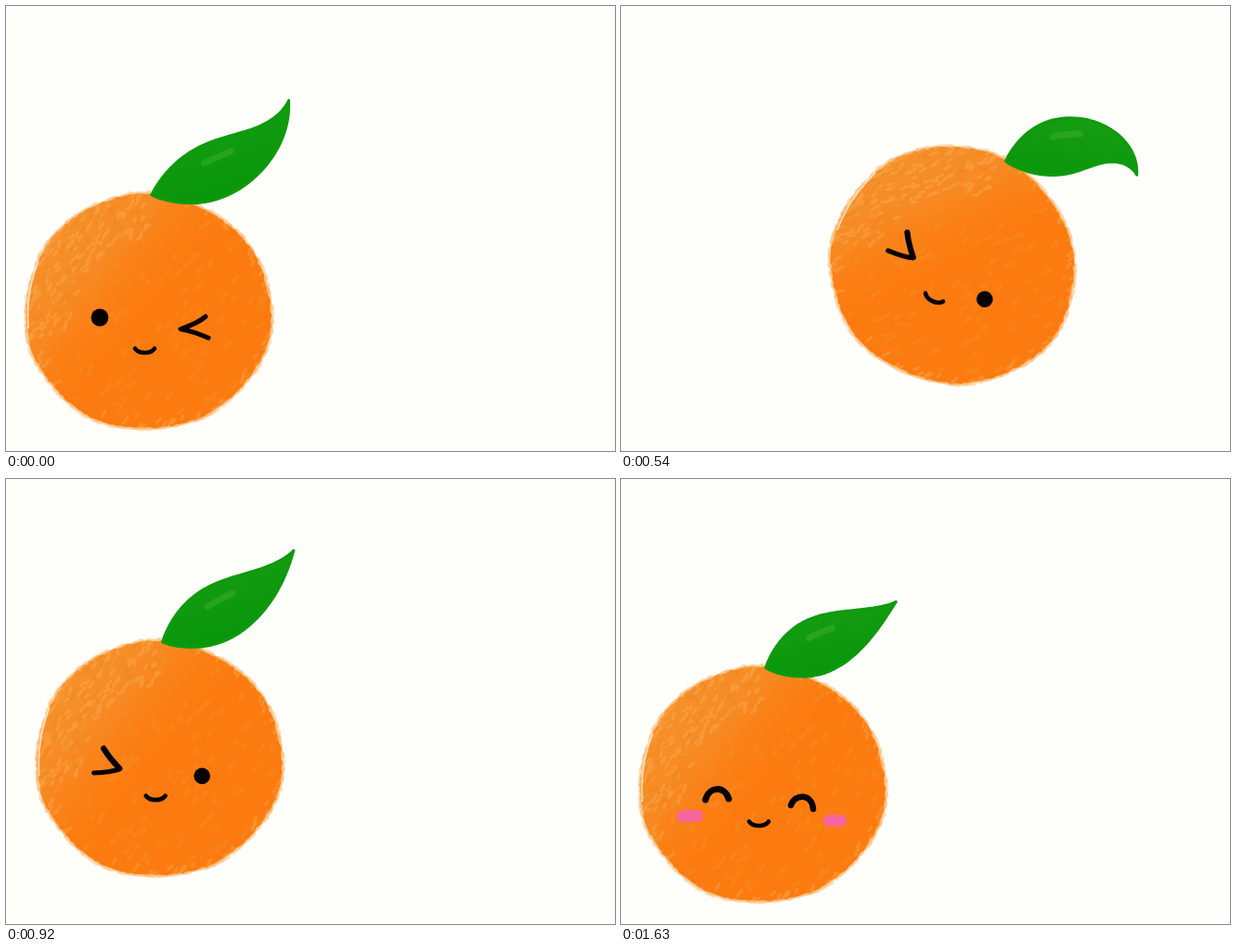
An HTML page that plays this animation: 656 by 480 pixels, repeating every 1680 ms.

```html
<!DOCTYPE html>
<html lang="en">
<head>
<meta charset="utf-8">
<title>Hopping orange</title>
<style>
html, body { margin: 0; width: 100%; height: 100%; overflow: hidden; background: #fefefb; }
svg { display: block; width: 656px; height: 480px; }
.ink { fill: none; stroke: #050200; stroke-width: 5; stroke-linecap: round; stroke-linejoin: round; }
.dot { fill: #050200; }
</style>
</head>
<body>
<svg viewBox="0 0 656 480">
  <defs>
    <linearGradient id="shade" x1="0" y1="0.12" x2="0.6" y2="0.6">
      <stop offset="0" stop-color="#f4962f"/>
      <stop offset="0.45" stop-color="#f68f2a" stop-opacity="0.7"/>
      <stop offset="0.8" stop-color="#fa8418" stop-opacity="0"/>
    </linearGradient>
    <linearGradient id="green" x1="0" y1="0" x2="0.4" y2="1">
      <stop offset="0" stop-color="#1a9f14"/>
      <stop offset="1" stop-color="#08960a"/>
    </linearGradient>
    <clipPath id="skin"><path id="skinPath"/></clipPath>
  </defs>
  <g id="orange">
    <g id="fringe" fill="#fbab55"></g>
    <path id="body" fill="#fc7b10"/>
    <path id="tone" fill="url(#shade)"/>
    <g id="marks" clip-path="url(#skin)" fill="none" stroke-linecap="round"></g>
    <path d="M-118-55Q-132-20-129 18" fill="none" stroke="#fff0da" stroke-width="1.8" opacity="0.8"/>
    <path class="ink" d="M-14 39.5C-10 45.5 3 45.5 7 39.5" style="stroke-width:4.6"/>
    <g class="face">
      <circle class="dot" cx="-52" cy="6" r="9.4"/>
      <path class="ink" d="M62 5Q54 12 35 18.5Q49 21 65 28"/>
    </g>
    <g class="face">
      <path class="ink" d="M-42 10.5Q-50 14-70 15"/>
      <path class="ink" d="M-59.5-11.5Q-54-2-42.5 10" style="stroke-width:6.2"/>
      <circle class="dot" cx="46.5" cy="18.3" r="8.8"/>
    </g>
    <g class="face">
      <path class="ink" d="M-61 16C-57 1-40 1-36 15" style="stroke-width:7"/>
      <path class="ink" d="M31 22C35 9 54 9 55 26" style="stroke-width:6.5"/>
      <rect x="-92" y="27" width="28" height="13" rx="6" fill="#f765a0"/>
      <rect x="66" y="32" width="25" height="13" rx="6" fill="#f765a0"/>
    </g>
    <g transform="translate(4 -126)">
      <path id="leaf" fill="url(#green)" stroke="#0f9a0e" stroke-width="3" stroke-linejoin="round"/>
      <path id="shine" fill="none" stroke="#5cba40" stroke-width="7" stroke-linecap="round" opacity="0.3"/>
    </g>
  </g>
</svg>
<script>
const $ = id => document.getElementById(id);
const TAU = Math.PI * 2;
const mix = (a, b, k) => a + (b - a) * k;
const clamp = v => Math.max(0, Math.min(1, v));
const part = (a, b, n) => clamp((n - a) / (b - a));
const smooth = u => u * u * (3 - 2 * u);
const fix = p => p.map(v => v.toFixed(1)).join(' ');
const line = pts => 'M' + pts.map(fix).join('L');

let seed = 7;
function rnd() {
  seed = (seed * 16807) % 2147483647;
  return seed / 2147483647;
}

// Slightly uneven ellipse
function rim(a, scale) {
  const r = scale * (1 + 0.008 * Math.sin(3 * a + 1) + 0.006 * Math.sin(7 * a));
  return [134 * r * Math.cos(a), 128.5 * r * Math.sin(a)];
}

function rough(scale, jitter) {
  const pts = [];
  for (let i = 0; i < 220; i++) pts.push(rim(i / 220 * TAU, scale + (rnd() - 0.5) * jitter));
  return line(pts) + 'Z';
}

const skin = rough(0.982, 0.014);
['body', 'tone', 'skinPath'].forEach(id => $(id).setAttribute('d', skin));
for (let i = 0; i < 3; i++) {
  $('fringe').insertAdjacentHTML('beforeend', `<path d="${rough(0.99 + i * 0.007, 0.024)}" opacity="0.4"/>`);
}

function addMarks(count, color, width, opacity, place) {
  let d = '';
  for (let i = 0; i < count; i++) {
    d += `M${fix(place())}l${fix([1 + rnd() * 4, -2 - rnd() * 5])}`;
  }
  $('marks').insertAdjacentHTML('beforeend',
    `<path d="${d}" stroke="${color}" stroke-width="${width}" opacity="${opacity}"/>`);
}
const upperLeft = () => rim(mix(2.9, 4.7, rnd()), mix(0.6, 1, rnd()));
const anywhere = () => rim(rnd() * TAU, Math.sqrt(rnd()));
const border = () => rim(rnd() * TAU, mix(0.93, 1, rnd()));
addMarks(110, '#fab562', 3, 0.35, upperLeft);
addMarks(80, '#ec8520', 3, 0.4, upperLeft);
addMarks(110, '#f1932c', 4, 0.35, anywhere);
addMarks(90, '#fba548', 3, 0.45, border);

// Leaf poses: angle at the stem, bend towards the tip, length
const curl = [0.36, 1.05, 187];
const mild = [0.4, 0.3, 158];
const straight = [0.59, 0.1, 162];
const droop = [0.72, -1.7, 158];
const poses = [[0, curl], [10, curl], [13, droop], [19, straight], [25, curl],
  [26.5, curl], [29.6, droop], [34.5, straight], [39, mild]];

function leafPose(n) {
  const i = Math.max(1, poses.findIndex(p => p[0] >= n));
  const [from, a] = poses[i - 1], [to, b] = poses[i];
  const k = smooth(part(from, to, n));
  return a.map((v, j) => mix(v, b[j], k));
}

// Walk along the midrib and lay out both edges
function drawLeaf(n) {
  const [lean, bend, length] = leafPose(n);
  const steps = 40, upper = [], lower = [], rib = [];
  let x = 0, y = 0;
  for (let i = 0; i <= steps; i++) {
    const s = i / steps, a = lean + bend * s ** 3;
    const w = 30 * Math.abs(Math.sin(Math.PI * s ** 0.75)) ** 1.15;
    const dx = Math.sin(a) * w, dy = Math.cos(a) * w;
    upper.push([x - dx, y - dy]);
    lower.unshift([x + dx, y + dy]);
    rib.push([x - dx * 0.4, y - dy * 0.4]);
    x += Math.cos(a) * length / steps;
    y -= Math.sin(a) * length / steps;
  }
  $('leaf').setAttribute('d', line([...upper, ...lower]) + 'Z');
  $('shine').setAttribute('d', line(rib.slice(14, 22)));
}

function hop(n, from, to, height) {
  const u = part(from, to, n);
  return 4 * height * u * (1 - u);
}

const faces = document.querySelectorAll('.face');
const LOOP = 1680, STEP = 1000 / 24, LAST = 39;

function draw(time) {
  const t = Math.floor((time % LOOP) / 10) * 10;
  const n = Math.min(LAST, Math.floor((t + 4.99) / STEP));
  const x = 153 + 238 * Math.sin(part(0, 10.3, n) * Math.PI / 2) - 239 * part(10.3, 22.5, n) ** 1.3;
  const y = 330 - hop(n, 0, 9.61, 71) - hop(n, 9.9, 23.5, 71) - hop(n, 26.5, 38.8, 43);
  const tilt = 28 * (smooth(part(1, 11, n)) - smooth(part(11.5, 19, n)));
  $('orange').setAttribute('transform', `translate(${fix([x, y])}) rotate(${tilt.toFixed(2)})`);
  const mood = n < 10 ? 0 : n < 26 ? 1 : 2;
  faces.forEach((f, i) => f.setAttribute('visibility', i === mood ? 'visible' : 'hidden'));
  drawLeaf(n);
}

const start = performance.now();
function loop() {
  draw(performance.now() - start);
  requestAnimationFrame(loop);
}
loop();
</script>
</body>
</html>
```
